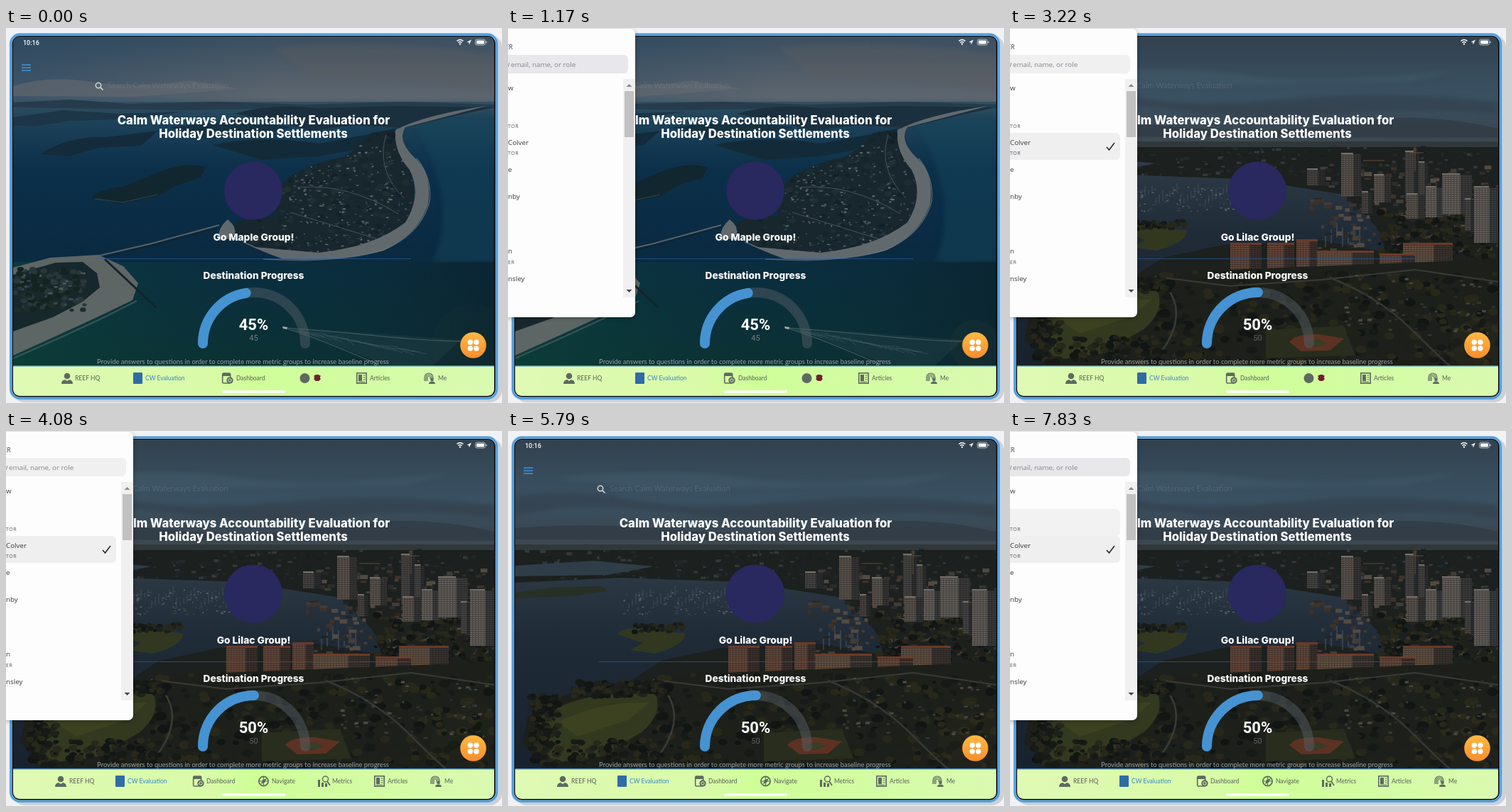
An HTML page that plays this animation: 698 px wide and 529 px high, repeating every 8000 ms.

```html
<!DOCTYPE html>
<html lang="en">
<head>
<meta charset="utf-8">
<title>Destination progress</title>
<style>
html, body { margin: 0; width: 100%; height: 100%; overflow: hidden; background: #f1f2f5; }
svg { display: block; width: 698px; height: 529px; }
.head { font-family: Inter, sans-serif; font-weight: 800; fill: #fff; text-anchor: middle; }
.soft { font-family: Lato, sans-serif; }
.list { font-family: "Open Sans", sans-serif; font-size: 9.8px; fill: #3b3b40; }
.role { font-size: 7px; letter-spacing: .5px; fill: #55555c; }
</style>
</head>
<body>
<svg id="stage" viewBox="0 0 698 529" xmlns="http://www.w3.org/2000/svg"></svg>
<script>
const LOOP = 8000;
let seed = 41;
const rnd = () => (seed = seed * 16807 % 2147483647) / 2147483647;
const pick = list => list[Math.floor(rnd() * list.length)];
const many = (n, fn) => Array.from({ length: n }, (_, i) => fn(i)).join('');

const rect = (x, y, w, h, fill, more = '') =>
  `<rect x="${x}" y="${y}" width="${w}" height="${h}" fill="${fill}" ${more}/>`;
const disc = (x, y, r, fill, more = '') =>
  `<circle cx="${x}" cy="${y}" r="${r}" fill="${fill}" ${more}/>`;
const path = (d, fill, more = '') => `<path d="${d}" fill="${fill}" ${more}/>`;
const line = (d, stroke, w, more = '') =>
  `<path d="${d}" fill="none" stroke="${stroke}" stroke-width="${w}" ${more}/>`;
const text = (x, y, size, cls, s, more = '') =>
  `<text x="${x}" y="${y}" font-size="${size}" class="${cls}" ${more}>${s}</text>`;
const group = (id, body, more = '') => `<g id="${id}" ${more}>${body}</g>`;
const stopList = stops => stops.map(([at, c, o = 1]) =>
  `<stop offset="${at}" stop-color="${c}" stop-opacity="${o}"/>`).join('');
const down = (id, ...stops) =>
  `<linearGradient id="${id}" x2="0" y2="1">${stopList(stops)}</linearGradient>`;
const across = (id, ...stops) => `<linearGradient id="${id}">${stopList(stops)}</linearGradient>`;

// Small blobs or blocks spread over a box
const blobs = (n, x, y, w, h, size, fills) => many(n, () => {
  const r = size * (.5 + rnd());
  return `<ellipse cx="${(x + rnd() * w).toFixed(1)}" cy="${(y + rnd() * h).toFixed(1)}" ` +
    `rx="${(r * 1.4).toFixed(1)}" ry="${r.toFixed(1)}" fill="${pick(fills)}"/>`;
});
const blocks = (n, x, y, w, h, size, fills) => many(n, () =>
  rect((x + rnd() * w).toFixed(1), (y + rnd() * h).toFixed(1),
    (size * (.6 + rnd())).toFixed(1), (size * (.4 + rnd() * .5)).toFixed(1), pick(fills)));

const town = 'M548 142Q545 172 566 198Q586 234 562 274Q520 308 440 317L352 309Q312 290 324 273L380 264' +
  'Q372 236 396 212Q430 190 474 182Q500 168 514 148Z';

const defs = '<defs>' +
  down('haze', [0, '#3a4f60'], [.5, '#515d69'], [.85, '#5d666f'], [1, '#43596b']) +
  across('west', [0, '#1f4360', .5], [.55, '#1f4360', 0]) +
  down('gulf', [0, '#34505f'], [.07, '#1d4259'], [.25, '#0c304a'], [.55, '#0a2a42'], [.8, '#0a2e38'], [1, '#0c302f']) +
  across('deep', [0, '#0c4a40', .5], [.5, '#0c3540', .2], [1, '#0b222e', .7]) +
  down('dusk', [0, '#32414e'], [.35, '#374c5c'], [.55, '#3b5263'], [.8, '#394752'], [1, '#3f4a50']) +
  down('bay', [0, '#2b3843'], [.3, '#202b38'], [1, '#18222e']) +
  down('orange', [0, '#ffb941'], [1, '#f78d2d']) +
  across('bar', [0, '#dffab4'], [.4, '#d9fba8'], [.5, '#cffe98'], [1, '#d9fab0']) +
  `<clipPath id="screen"><rect x="10" y="12" width="677" height="507" rx="9"/></clipPath>
   <clipPath id="town"><path d="${town}"/></clipPath>
   <pattern id="panes" width="4" height="3" patternUnits="userSpaceOnUse">
   <path d="M0 .6H4M.7 0V3" stroke="#1f2022" stroke-opacity=".5" stroke-width="1.1"/></pattern>
   <filter id="blur"><feGaussianBlur stdDeviation="3"/></filter></defs>`;

function coast() {
  return rect(10, 12, 677, 100, 'url(#haze)') +
    path('M380 28Q520 12 687 38V92Q560 66 430 72Z', '#5c5c5e', 'opacity=".4" filter="url(#blur)"') +
    rect(10, 12, 677, 100, 'url(#west)') +
    path('M10 82Q60 66 120 76T260 74L330 86L180 97L10 96Z', '#666a71', 'opacity=".6"') +
    rect(10, 104, 677, 374, 'url(#gulf)') +
    path('M570 130Q650 122 687 130V330H600Q640 240 570 130Z', '#16465c', 'opacity=".45" filter="url(#blur)"') +
    path('M10 330H687V478H10Z', 'url(#deep)') +
    path('M10 105L90 101L175 107L300 104L420 108L560 104L687 108V113L540 117L410 113L250 116L10 112Z', '#263c4d') +
    path('M322 121Q370 106 440 113L548 110L687 112L640 122L561 141L490 137L430 145L390 134Z', '#1b303f') +
    path('M10 126L80 116L160 121L250 118L180 128L90 131L40 139L10 137Z', '#1c3547') +
    path('M48 178Q90 151 142 154L214 145L190 166L130 169L88 181Z', '#132b3a') +
    path('M230 140L330 130L400 140L360 152L280 156Z', '#17313f') +
    path('M121 240Q126 228 164 224L218 202Q256 188 281 197L274 211L240 222L212 238L160 248Z', '#11262f') +
    line('M125 241L164 246L214 235', '#34474e', 1) +
    path('M290 165Q360 150 440 163L520 148L500 170L440 181L360 186Z', '#132b38') +
    path('M676 110Q590 122 548 144Q544 174 568 200Q586 236 562 274Q520 306 440 316L352 309Q316 292 300 300' +
      'Q296 284 312 270Q330 286 318 294Q350 312 390 326Q470 330 530 314Q580 292 594 248Q600 205 574 182Q550 158 562 140Z',
      '#62696d') +
    line('M362 326Q470 332 532 313Q584 290 596 245Q600 212 578 184', '#7b8286', 1.5, 'opacity=".6"') +
    path(town, '#18272e') +
    `<g clip-path="url(#town)">` +
    blobs(260, 310, 145, 280, 175, 2.8, ['#11212a', '#1b2d33', '#202f31', '#15262b']) +
    blocks(330, 385, 165, 200, 150, 2.8, ['#4a5459', '#37464d', '#5c676c', '#283a42']) +
    line('M535 150Q520 200 560 240M410 225Q480 218 552 262M400 260L530 300', '#465258', 1) + '</g>' +
    line('M300 278L205 304L110 326', '#566067', 2) +
    line('M300 281L205 307L112 329', '#0d2430', 1.6) +
    path('M10 338L62 324L130 320L165 336L186 360L178 384L128 408L76 432L10 462Z', '#5e6565') +
    path('M10 348L70 331L108 330L128 346L132 366L108 386L66 408L10 428Z', '#17282c') +
    blobs(120, 12, 340, 100, 58, 3, ['#13231f', '#1d2d2a', '#28373a']) +
    blocks(24, 18, 342, 90, 50, 4, ['#50595a', '#3b484b']) +
    line('M139 326L211 394', '#14232a', 3) +
    line('M10 466L78 436L130 412L184 385', '#4a6063', 2, 'opacity=".7"') +
    path('M390 422L480 428L640 440L600 477L540 477L440 439Z', '#2b4a50', 'opacity=".3"') +
    line('M392 423Q450 427 520 434T640 442M394 424Q430 434 525 475', '#62777c', 1.2, 'opacity=".6"') +
    many(34, i => line(`M${405 + i * 5} ${426 + i * .9}l${10 + i % 5 * 4} ${2 + i % 4 * 2}`, '#5a7278', .8, 'opacity=".45"')) +
    path('M389 421l7 1l-1 3l-5-1z', '#a4adb0');
}

// x, y, width, height, tone
const TOWERS = [
  [418, 200, 25, 22, 1], [466, 178, 28, 60, 0], [495, 232, 15, 30, 1], [512, 208, 24, 38, 0],
  [556, 175, 20, 70, 1], [575, 190, 14, 60, 1], [558, 235, 26, 34, 0], [585, 225, 25, 42, 2],
  [608, 207, 42, 56, 2], [640, 242, 14, 44, 1], [653, 225, 35, 78, 2], [310, 305, 44, 45, 3],
  [362, 305, 38, 50, 3], [403, 300, 30, 48, 3], [432, 316, 80, 28, 4], [553, 305, 70, 27, 4],
  [520, 320, 50, 18, 3]
];
const TONES = ['#5f564d', '#474542', '#68635d', '#6a4938', '#68523f'];

function city() {
  const greens = ['#161a17', '#1e211a', '#28281a', '#111513'];
  return rect(10, 12, 677, 160, 'url(#dusk)') +
    path('M10 92Q90 80 170 96T360 102T540 94T687 104V122Q560 110 470 122T240 116T10 120Z', '#303d49',
      'opacity=".6" filter="url(#blur)"') +
    path('M10 137Q120 128 240 140T470 134T687 142V155L10 153Z', '#2f3a43', 'opacity=".7"') +
    path('M60 66Q230 50 330 66T640 58L560 76L200 82Z', '#46606f', 'opacity=".4" filter="url(#blur)"') +
    rect(10, 162, 677, 316, '#1c201e') +
    rect(10, 160, 677, 8, '#30383b') +
    blocks(230, 10, 166, 677, 42, 5, ['#23292b', '#1d2325', '#34383a', '#181e21']) +
    path('M10 190L120 183L205 191L140 203L10 205Z', '#2f3d49') +
    path('M10 214L160 207L330 213L470 235L520 285L528 316L440 300L300 306L215 324L170 354L80 372L28 402L20 440L60 478H10Z', 'url(#bay)') +
    path('M10 228L70 220L132 219L140 226L90 233L10 236Z', '#282f25') +
    path('M155 287Q160 276 192 279L250 286Q246 304 206 314L172 309L190 299Z', '#32381f') +
    blobs(45, 178, 272, 70, 12, 2.4, greens) +
    blocks(150, 162, 222, 210, 36, 2.4, ['#5a6066', '#3c454d', '#2c363f']) +
    many(38, i => line(`M${170 + i * 5} ${250 - i % 7 * 3}v-${7 + i % 5 * 2}`, '#5d646a', .5)) +
    many(7, i => line(`M${444 + i * 8} ${309 - i % 3 * 5}v-${16 + i % 4 * 4}`, '#747a7e', .6)) +
    blocks(230, 420, 190, 265, 125, 7, ['#403d39', '#524a42', '#2c2c2a', '#222524', '#3d322a']) +
    blobs(260, 520, 258, 165, 76, 3.2, greens) +
    TOWERS.map(([x, y, w, h, c]) => rect(x, y, w, h, TONES[c]) + rect(x, y, w, h, 'url(#panes)') +
      rect(x + w * .62, y, w * .38, h, '#13171a', 'opacity=".5"') +
      (c > 2 ? rect(x, y - 2, w, 3, '#6a3a29') : rect(x, y - 2, w * .6, 2, '#75706a'))).join('') +
    line('M570 202V168M562 176H582M497 187H527', '#7a5634', .8) +
    path('M28 402L80 372L170 354L230 344L687 326V478H60L20 440Z', '#1d201a') +
    blobs(420, 200, 344, 487, 132, 4.2, greens) +
    path('M44 405Q88 374 154 371L208 371Q218 400 188 425L130 459L65 468Q40 440 44 405Z', '#32391f') +
    path('M70 411Q128 381 199 383L170 407L98 431Z', '#414621', 'opacity=".7"') +
    line('M204 350Q245 382 230 425T180 477', '#3a3b36', 2.5) +
    line('M215 352L310 364L440 355L570 341L687 358', '#393a36', 2) +
    line('M450 352Q520 380 565 425T620 477', '#343733', 2.5) +
    blobs(130, 32, 372, 40, 100, 3.4, greens) + blobs(100, 90, 354, 135, 20, 3.4, greens) +
    blobs(90, 85, 436, 140, 36, 3.4, greens) +
    path('M360 426L470 420L486 462L360 466Z', '#282d1e') +
    path('M393 443Q402 431 434 432L470 438L450 455L410 456Z', '#5d3223') +
    path('M414 444L434 438L447 445L430 451Z', '#3a3c25') +
    blocks(70, 470, 345, 210, 90, 4, ['#3a3a37', '#4c4841', '#2b2d2a']);
}

const gray = '#5d6a60';
const icons = {
  person: disc(8, 5, 4.3, gray) + path('M0 16Q0 11 5 10L8 12L11 10Q16 11 16 16Z', gray),
  mark: rect(0, 0, 13, 16, '#2f6ca6', 'rx="1"'),
  board: rect(.7, 1, 11, 14, 'none', `stroke="${gray}" stroke-width="1.6" rx="1.5"`) + rect(1, 1, 11, 4, gray) +
    disc(11, 11, 4.7, gray) + disc(11, 11, 2.2, 'none', 'stroke="#dcfaae"'),
  round: disc(7.5, 8, 7, gray),
  bug: rect(1, 3, 8, 9, '#7b1f2c', 'rx="3"') + line('M0 5H10M0 9H10', '#57202a', 1),
  compass: disc(7.5, 8, 6.6, 'none', `stroke="${gray}" stroke-width="1.7"`) +
    line('M7.5 1V15M.5 8H14.5', gray, 1) + path('M4 12L6 6L12 4L9 10Z', gray),
  chart: path('M0 6h3v10H0zM5 10h3v6H5zM10 11h3v5h-3z', gray) +
    disc(10.5, 5, 4, 'none', `stroke="${gray}" stroke-width="1.5"`) + line('M13 8L17 14', gray, 1.8),
  pages: rect(.8, .8, 13.4, 14.4, 'none', `stroke="${gray}" stroke-width="1.6"`) +
    rect(3, 3, 5, 9, gray) + line('M9.5 4H12.5M9.5 7H12.5M9.5 10H12.5M3 13.2H12', gray, 1),
  print: [2, 4, 6].map(r => line(`M${7 - r} 12V7a${r} ${r} 0 0 1 ${2 * r} 0V9`, gray, 1.2)).join('') +
    disc(11.5, 10, 2.3, gray) + path('M7 16Q7 12.5 11.5 12.5T16 16Z', gray)
};
const tab = (icon, x, label = '', tx = 0, fill = '#566158') =>
  `<g transform="translate(${x} 486)">${icons[icon]}</g>` +
  text(tx, 497, 8.5, 'soft', label, `fill="${fill}"`);
const blue = '#3886c4';

const tabsA = tab('person', 78, 'REEF HQ', 97) + tab('mark', 179, 'CW Evaluation', 196, blue) +
  tab('board', 304, 'Dashboard', 324) + tab('round', 413) + tab('bug', 433) +
  tab('pages', 493, 'Articles', 512) + tab('print', 588, 'Me', 608);
const tabsB = tab('person', 69, 'REEF HQ', 89) + tab('mark', 154, 'CW Evaluation', 171, blue) +
  tab('board', 263, 'Dashboard', 282) + tab('compass', 355, 'Navigate', 374) +
  tab('chart', 439, 'Metrics', 459) + tab('pages', 518, 'Articles', 537) + tab('print', 597, 'Me', 617);

const arc = 'M277 445A72 72 0 0 1 421 445';
const content =
  text(24, 24, 9, '', '10:16', 'fill="#fff" font-family="Roboto, sans-serif" font-weight="500"') +
  line('M634.5 18.5Q639 14.5 643.5 18.5M636.5 20.7Q639 18.4 641.5 20.7', '#fff', 1.5) + disc(639, 22.6, 1.2, '#fff') +
  path('M655 16.5L651.8 23.5L651.4 20.3L648.6 19.8Z', '#fff') +
  rect(660.5, 16, 14, 8, 'none', 'rx="2.4" stroke="#fff" stroke-opacity=".6"') +
  rect(662, 17.5, 11, 5, '#fff', 'rx="1"') + rect(675.5, 18.7, 1, 2.6, '#fff') +
  line('M22 52H35M22 56H35M22 60H35', '#3d82c0', 2) +
  disc(130, 81, 3.7, 'none', 'stroke="#d3d7da" stroke-width="1.5"') + line('M133 84L136.5 87.5', '#d3d7da', 1.7) +
  text(143, 85, 11, 'soft', 'Search Calm Waterways Evaluation', 'fill="#89929a" opacity=".3"') +
  text(348.5, 135.5, 16.7, 'head', 'Calm Waterways Accountability Evaluation for') +
  text(348, 154.5, 16.7, 'head', 'Holiday Destination Settlements') +
  disc(348, 229.5, 41, '#29285f') +
  text(348.5, 300, 13.8, 'head', '', 'id="team"') +
  line('M128 325.5H570', '#2c63a6', 1, 'opacity=".65"') +
  text(348.5, 354, 13.7, 'head', 'Destination Progress') +
  line(arc, '#59626b', 14, 'stroke-linecap="round" opacity=".45"') +
  line(arc, '#4593d2', 14, 'id="gauge" stroke-linecap="round" pathLength="100"') +
  text(348.5, 426, 22, '', '', 'id="pct" fill="#fff" text-anchor="middle" font-family="Roboto, sans-serif" font-weight="700"') +
  text(348.5, 441, 11, '', '', 'id="num" fill="#777d82" text-anchor="middle" font-family="Roboto, sans-serif"') +
  text(333.5, 474, 9.42, 'soft', 'Provide answers to questions in order to complete more metric groups to increase baseline progress',
    'fill="#9aa2a6" text-anchor="middle"');

const fab = disc(657.5, 447.5, 18, '#ffb34a', 'id="pulse"') + disc(657.5, 447.5, 18.3, 'url(#orange)') +
  many(4, i => disc(653.3 + i % 2 * 8.6, 443.2 + (i >> 1) * 8.8, 3.7, '#fff'));

const item = (y, s, cls = '') => `<text x="0" y="${y}" class="list ${cls}">${s}</text>`;
const panel = rect(-12, 3, 191, 406, '#000', 'rx="7" opacity=".3" filter="url(#blur)"') +
  rect(-12, 1, 191, 407, '#fdfdfd', 'rx="7"') +
  text(6.5, 30, 9, 'list', 'ER', 'style="font-size:8.6px" text-anchor="end"') +
  rect(-12, 38, 181, 26, '#f0f0f1', 'id="field" rx="6"') +
  text(4, 55, 9.8, 'list', 'email, name, or role', 'style="fill:#85858d"') + line('M0 55L2 49', '#85858d', .9) +
  rect(-12, 110, 167, 38, '#f2f2f3', 'id="first" rx="6"') +
  rect(-12, 148, 167, 38, '#efeff0', 'id="second" rx="6"') +
  item(88, 'w') + item(141, 'TOR', 'role') + item(165, 'Colver') + item(179, 'TOR', 'role') + item(203, 'e') +
  item(241, 'nby') + item(318, 'n') + item(333, 'ER', 'role') + item(357, 'nsley') +
  line('M136 168L139.5 172L147 162', '#232326', 1.5, 'id="check"') +
  rect(162, 72, 17, 308, '#f0f0f0') + rect(164, 89, 13, 65, '#c1c1c1') +
  path('M166.5 83L170.5 79L174.5 83Z', '#8a8a8a') + path('M166.5 369L170.5 373L174.5 369Z', '#454545');

document.getElementById('stage').innerHTML = defs +
  rect(0, 0, 698, 529, '#f1f2f5') + rect(9, 10, 689, 518, '#cdd1d7', 'rx="17"') +
  rect(6.7, 9, 684, 513.5, '#07090c', 'rx="13" stroke="#9cc6ea" stroke-width="4"') +
  rect(6.7, 9, 684, 513.5, 'none', 'rx="13" stroke="#4b9bdb" stroke-width="2.4"') +
  '<g clip-path="url(#screen)">' + group('coast', coast()) + group('city', city()) + content + fab +
  rect(10, 477, 677, 42, 'url(#bar)') + rect(10, 476, 677, 1.4, '#4087b5') +
  group('tabsA', tabsA) + group('tabsB', tabsB) + rect(304, 511.3, 89, 3.4, '#fff', 'rx="1.7"') + '</g>' +
  group('panel', panel);

const $ = id => document.getElementById(id);
const show = (id, on) => $(id).setAttribute('display', on ? 'inline' : 'none');
const within = (t, a, b) => t >= a && t < b;

function draw(t) {
  const second = t >= 3220, value = second ? 50 : 45;
  show('coast', !second);
  show('city', second);
  show('tabsA', t < 3340);
  show('tabsB', t >= 3340);
  $('team').textContent = second ? 'Go Lilac Group!' : 'Go Maple Group!';
  $('pct').textContent = value + '%';
  $('num').textContent = value;
  $('num').setAttribute('opacity', second ? .7 : 1);
  $('gauge').setAttribute('stroke-dasharray', value + ' 200');

  show('panel', within(t, 1170, 5410) || t >= 7220);
  show('first', within(t, 1650, 1890) || t >= 7220);
  show('second', t >= 1890);
  show('check', t >= 2480);
  $('field').setAttribute('fill', within(t, 2230, 5410) ? '#f0f0f1' : '#e8e8ea');

  const p = (t + 1500) % 2000 / 2000;
  $('pulse').setAttribute('r', 18 + 54 * p);
  $('pulse').setAttribute('opacity', .04 * (1 - p));
}

function tick() {
  draw(performance.now() % LOOP);
  requestAnimationFrame(tick);
}
tick();
</script>
</body>
</html>
```
